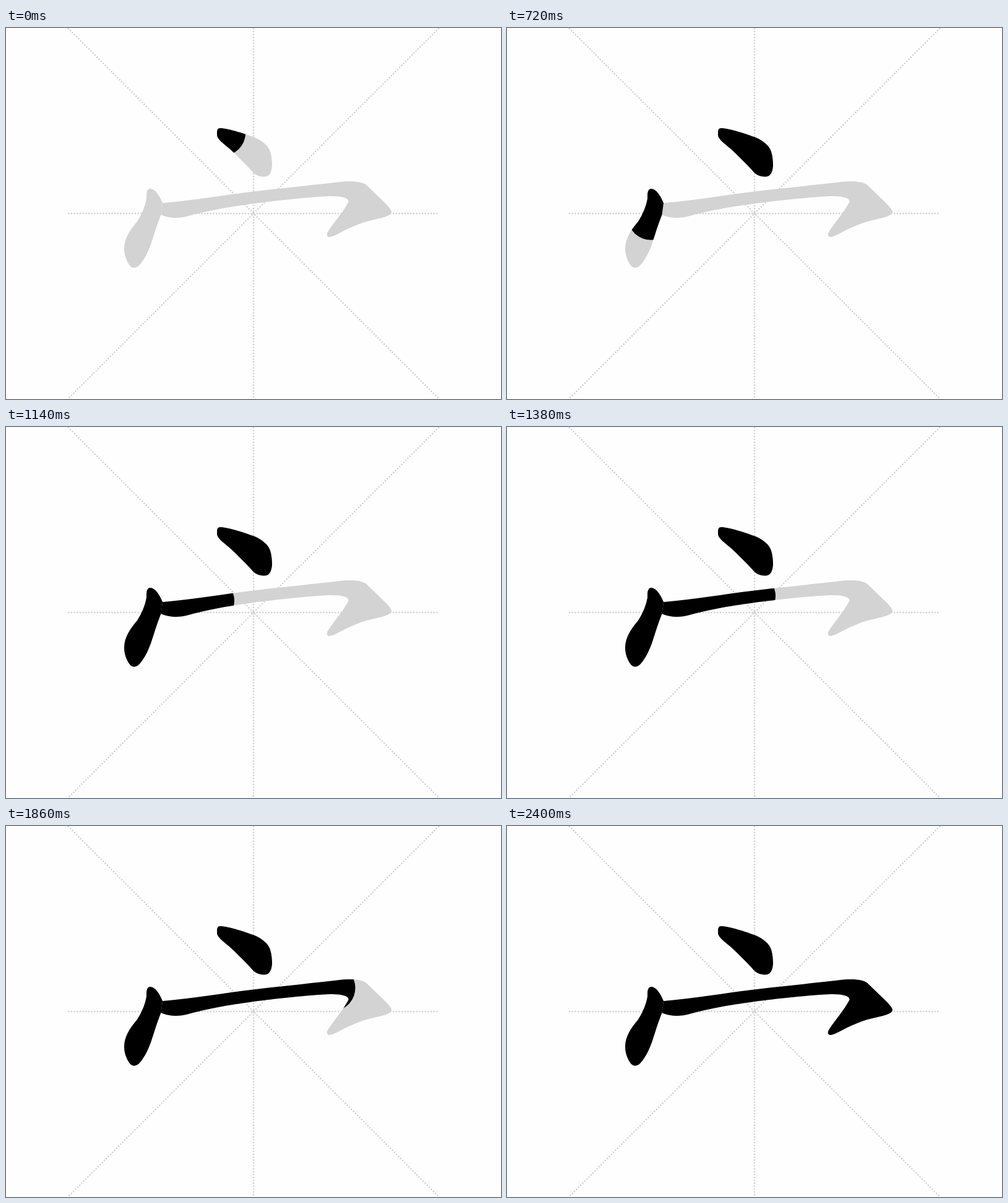
Write an HTML page that moves like this. It is 800 by 600 pixels and loops after 2460 ms.

```html
<!DOCTYPE html>
<html lang="en">
<head>
<meta charset="utf-8">
<title>Stroke order</title>
<style>
  html, body { margin: 0; width: 100%; height: 100%; overflow: hidden; background: #fefefe; }
  svg { display: block; }
  .guides { stroke: #d3d3d3; stroke-dasharray: 1 1; }
  .shape { fill: #d3d3d3; }
  .brush { fill: none; stroke: #000; stroke-width: 75; stroke-linecap: round; stroke-linejoin: round; }
</style>
</head>
<body>
<svg id="stage" width="800" height="600" viewBox="0 0 800 600">
  <path class="guides" transform="translate(100) scale(2.34375)"
    d="M0 0L256 256M256 0L0 256M128 0V256M0 128H256"/>
</svg>
<script>
const LOOP = 2460, STEP = 60, SPEED = 0.273; // ms, ms, px per ms

// Each stroke: its outline, the line the brush follows, and when it starts.
const strokes = [
  {
    start: 0,
    outline: `M341 170C341 165 342 162 346 162C360 162 388 172 402 177C415 183 424.500 191 427 200
      C429.500 208 430 216 430 223C429 235 425 240.500 417 240.500C408 240.500 402 237 397 231
      C386 219 373 206 361 195C350 186 341 179 341 173Z`,
    line: 'M349.7 169.3L385 193L414 225'
  },
  {
    start: 556,
    outline: `M227 271C227 264 229 260 233 260C241 260 248 271 253 283L250.500 302
      C244 318 240 332 236 344C231 360 224 374 216 383C211 389 204 389 200 384
      C194 376 191 366 191 357C191 341 200 327 212 313Q224 294 227 276Z`,
    line: 'M239 261L232.5 305L215 352L209 375'
  },
  {
    start: 863,
    outline: `M253 283C300 279 350 270.500 400 264.500S497 254 535 249.500C562 246 577 249 583 254.500
      L614 284.500C620 291 623 295 623 298C622 304 608 307 597 309.500C577 313.500 560 321 543 329.500
      C531 336 526 338 522 338C518 337 518 333 520 330C527 318 545 298 553.500 281
      C554 275 543 272 527 272C500 272.500 445 278 400 284S325 296 295 304C280 308.500 262 308 250.500 302Z`,
    line: 'M257 294L331.5 281L461.5 265L527.5 262L548 262L578 277L588 297L525 333'
  }
];

const stage = document.getElementById('stage');

function add(tag, attrs, parent = stage) {
  const node = document.createElementNS('http://www.w3.org/2000/svg', tag);
  for (const name in attrs) node.setAttribute(name, attrs[name]);
  return parent.appendChild(node);
}

for (const { outline } of strokes) add('path', { class: 'shape', d: outline });

strokes.forEach((stroke, i) => {
  const clip = add('clipPath', { id: 'clip' + i });
  add('path', { d: stroke.outline }, clip);
  const group = add('g', { 'clip-path': `url(#clip${i})` });
  stroke.brush = add('path', { class: 'brush', d: stroke.line }, group);
});

function draw(now) {
  const time = Math.floor(now % LOOP / STEP) * STEP;
  for (const { start, brush } of strokes) {
    const drawn = Math.max(0.01, (time - start) * SPEED);
    brush.setAttribute('visibility', time < start ? 'hidden' : 'visible');
    brush.setAttribute('stroke-dasharray', `${drawn} 2000`);
  }
}

const begin = performance.now();
function tick() {
  draw(performance.now() - begin);
  requestAnimationFrame(tick);
}
tick();
</script>
</body>
</html>
```
